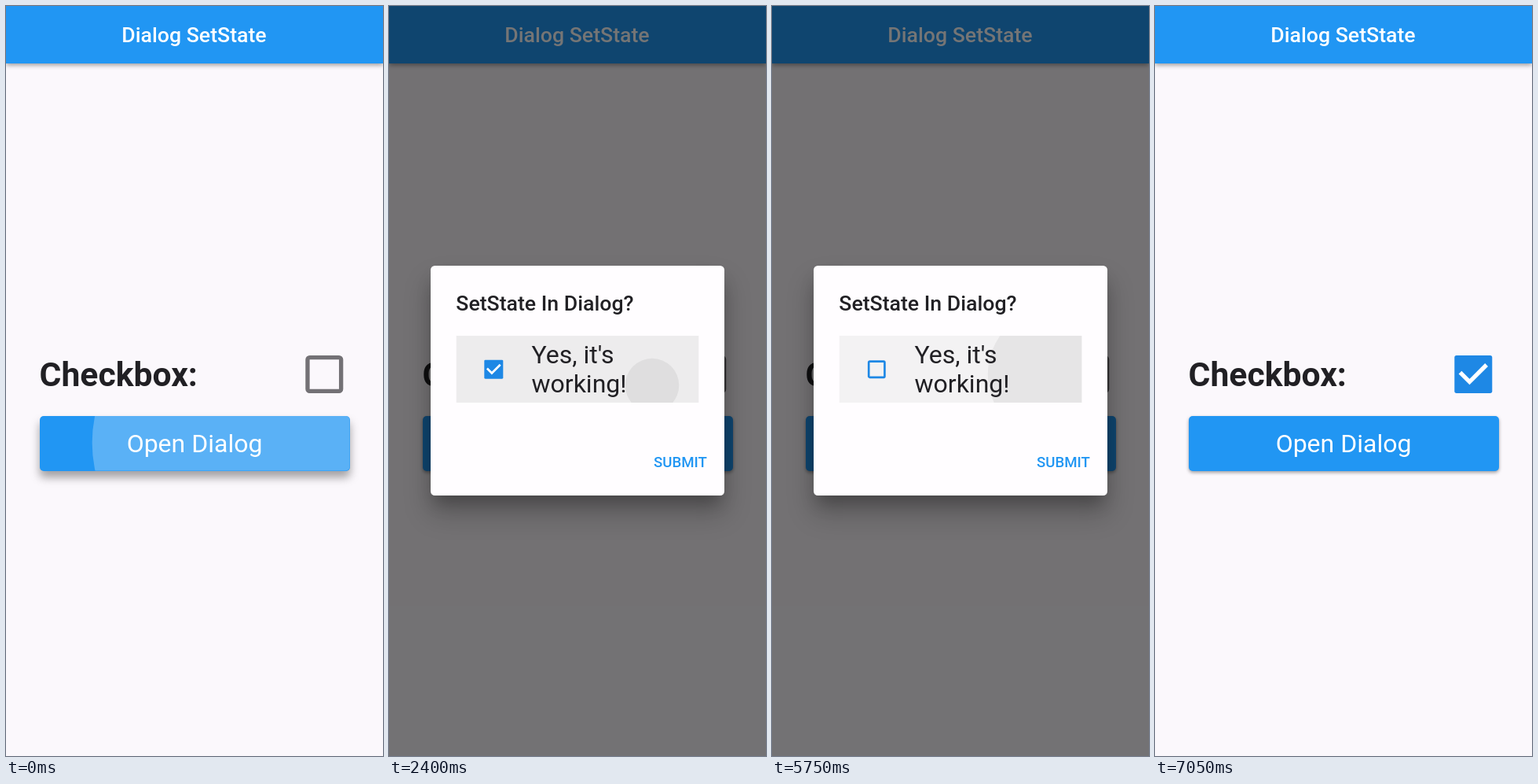
These frames come from a looping animation (480x953 px, 8 s). An HTML page:

```html
<!DOCTYPE html>
<html lang="en">
<head>
<meta charset="utf-8">
<title>Dialog state</title>
<style>
  html, body { margin: 0; width: 100%; height: 100%; overflow: hidden; background: #fbf8fc; }
  .layer, .layer > * { position: absolute; }
  .layer { left: 0; top: 0; width: 480px; height: 953px; overflow: hidden; }
  svg { left: 0; top: 0; font-family: Roboto, sans-serif; }
  .bar { left: 0; top: 0; width: 480px; height: 73px; background: #2196f3;
         box-shadow: 0 2px 6px rgba(0,0,0,.4); }
  .button { left: 43px; top: 521px; width: 394.5px; height: 69.5px; border-radius: 5px; background: #2196f3; }
  .barrier { inset: 0; background: rgba(0,0,0,.54); }
  .panel { left: 53px; top: 330px; width: 374px; height: 292px; border-radius: 5.3px; background: #fffdff;
           box-shadow: 0 14px 20px -6px rgba(0,0,0,.25), 0 22px 34px 2px rgba(0,0,0,.2); }
  .title { font-size: 26.67px; font-weight: 500; }
  .big { font-size: 32px; }
</style>
</head>
<body>
<div class="layer">
  <div class="bar"></div>
  <div class="button" id="button"></div>
  <svg width="480" height="953">
    <clipPath id="buttonClip"><rect x="43" y="521" width="394.5" height="69.5" rx="5"/></clipPath>
    <g clip-path="url(#buttonClip)"><circle id="buttonInk" cx="276" cy="555" fill="#fff"/></g>
    <text class="title" x="239.5" y="46" text-anchor="middle" fill="#fff">Dialog SetState</text>
    <text x="42.5" y="482.7" font-size="42.67" font-weight="700" fill="#212024">Checkbox:</text>
    <text class="big" x="240" y="566.5" text-anchor="middle" fill="#fff">Open Dialog</text>
    <g id="pageBox" transform="translate(381.3 444)"></g>
  </svg>
</div>
<div class="layer" id="dialog">
  <div class="barrier"></div>
  <div class="panel"></div>
  <svg width="480" height="953" fill="#212024">
    <clipPath id="rowClip"><rect x="85.5" y="419" width="309" height="85"/></clipPath>
    <g id="inks" clip-path="url(#rowClip)"></g>
    <clipPath id="submitClip"><rect x="327.5" y="555.5" width="89" height="48" rx="5"/></clipPath>
    <g clip-path="url(#submitClip)"><circle id="submitInk" cx="372" cy="579" fill="#2196f3" opacity=".12"/></g>
    <text class="title" x="85.3" y="387">SetState In Dialog?</text>
    <g id="rowBox" transform="translate(121.3 449.7)"></g>
    <text class="big" id="line1" x="181.5" y="453.8"></text>
    <text class="big" id="line2" x="181.5" y="491.3"></text>
    <text x="371" y="586" text-anchor="middle" font-size="18.67" font-weight="500" fill="#2196f3">SUBMIT</text>
  </svg>
</div>
<script>
const LOOP = 8000, OPEN = 30, CLOSE = 6820, FADE = 200;
const ROW = { left: 85.5, right: 394.5, top: 419, bottom: 504 };
const $ = id => document.getElementById(id);
const clamp = v => Math.min(1, Math.max(0, v));
const mix = (a, b, p) => a + (b - a) * p;
const easeOut = p => 1 - (1 - p) ** 2;

function svgNode(parent, tag, attrs) {
  const node = document.createElementNS('http://www.w3.org/2000/svg', tag);
  setAttrs(node, attrs);
  return parent.appendChild(node);
}
function setAttrs(node, attrs) {
  for (const name in attrs) node.setAttribute(name, attrs[name]);
}

// Presses on the dialog row: down time, up time, x, y. Each release toggles the state.
const taps = [
  [880, 1000, 325, 480], [1580, 1680, 220, 470], [1840, 1920, 220, 470],
  [2268, 2430, 335, 482], [2700, 2820, 332, 480], [4370, 4480, 360, 468],
  [4732, 4880, 362.5, 466], [5230, 5340, 360, 468], [5600, 5710, 360, 468]
].map(([down, up, x, y]) => ({
  down, up,
  reach: Math.hypot(Math.max(x - ROW.left, ROW.right - x), Math.max(y - ROW.top, ROW.bottom - y)),
  glow: svgNode($('inks'), 'rect', { x: ROW.left, y: ROW.top, width: 309, height: 85, fill: '#bcbcbc' }),
  splash: svgNode($('inks'), 'circle', { cx: x, cy: y, fill: '#c8c8c8' })
}));

// The splash spreads slowly while held, quickly once released.
function drawTap({ down, up, reach, glow, splash }, t) {
  const held = clamp((Math.min(t, up) - down) / 1000) * reach;
  const radius = Math.min(reach, held + Math.max(0, t - up) * 1.33);
  const left = t < down ? 0 : 1 - clamp((t - up) / FADE);
  const shown = Math.min(clamp((t - down) / FADE), clamp((up - down) / FADE));
  setAttrs(glow, { opacity: 0.4 * shown * left });
  setAttrs(splash, { r: radius, opacity: 0.4 * left });
}

function makeCheckbox(group, size) {
  const unit = size / 18;
  const box = svgNode(group, 'rect', { rx: unit });
  const mark = svgNode(group, 'path', {
    d: `M${size * .15} ${size * .45}L${size * .4} ${size * .7}L${size * .85} ${size * .25}`,
    fill: 'none', stroke: '#fff', 'stroke-width': 2 * unit, pathLength: 1
  });
  return value => {
    const filled = value >= 0.5;
    const inset = unit * (1 - Math.abs(2 * value - 1)) + (filled ? 0 : unit);
    setAttrs(box, {
      x: inset, y: inset, width: size - 2 * inset, height: size - 2 * inset,
      fill: filled ? '#1e88e5' : 'none',
      stroke: filled ? 'none' : value >= 0.2 ? '#1e88e5' : '#737175',
      'stroke-width': 2 * unit
    });
    setAttrs(mark, {
      'stroke-dasharray': `${clamp(value * 2 - 1)} 2`,
      visibility: value > 0.5 ? 'visible' : 'hidden'
    });
  };
}
const drawPageBox = makeCheckbox($('pageBox'), 48);
const drawRowBox = makeCheckbox($('rowBox'), 24);

function draw(t) {
  const settle = clamp(t / FADE);
  const drop = mix(8, 2, settle), blur = mix(12, 4, settle);
  $('button').style.boxShadow = `0 ${drop}px ${blur}px rgba(0,0,0,.36)`;
  setAttrs($('buttonInk'), { r: 165 + t * 1.33, opacity: 0.26 * (1 - settle) });

  const closing = clamp((t - CLOSE) / FADE);
  $('dialog').style.opacity = easeOut(clamp((t - OPEN) / 150)) * (1 - closing) ** 2;
  drawPageBox(closing);

  taps.forEach(tap => drawTap(tap, t));
  const done = taps.filter(tap => tap.up <= t);
  const checked = done.length % 2 === 1;
  const progress = done.length ? clamp((t - done.at(-1).up) / FADE) : 1;
  drawRowBox(checked ? progress : 1 - progress);
  $('line1').textContent = checked ? "Yes, it's" : 'No, it is not';
  $('line2').textContent = checked ? 'working!' : 'working?';

  setAttrs($('submitInk'), { r: 54 * clamp((t - 6200) / 500) });
}

const start = performance.now();
function tick() {
  draw((performance.now() - start) % LOOP);
  requestAnimationFrame(tick);
}
tick();
</script>
</body>
</html>
```
